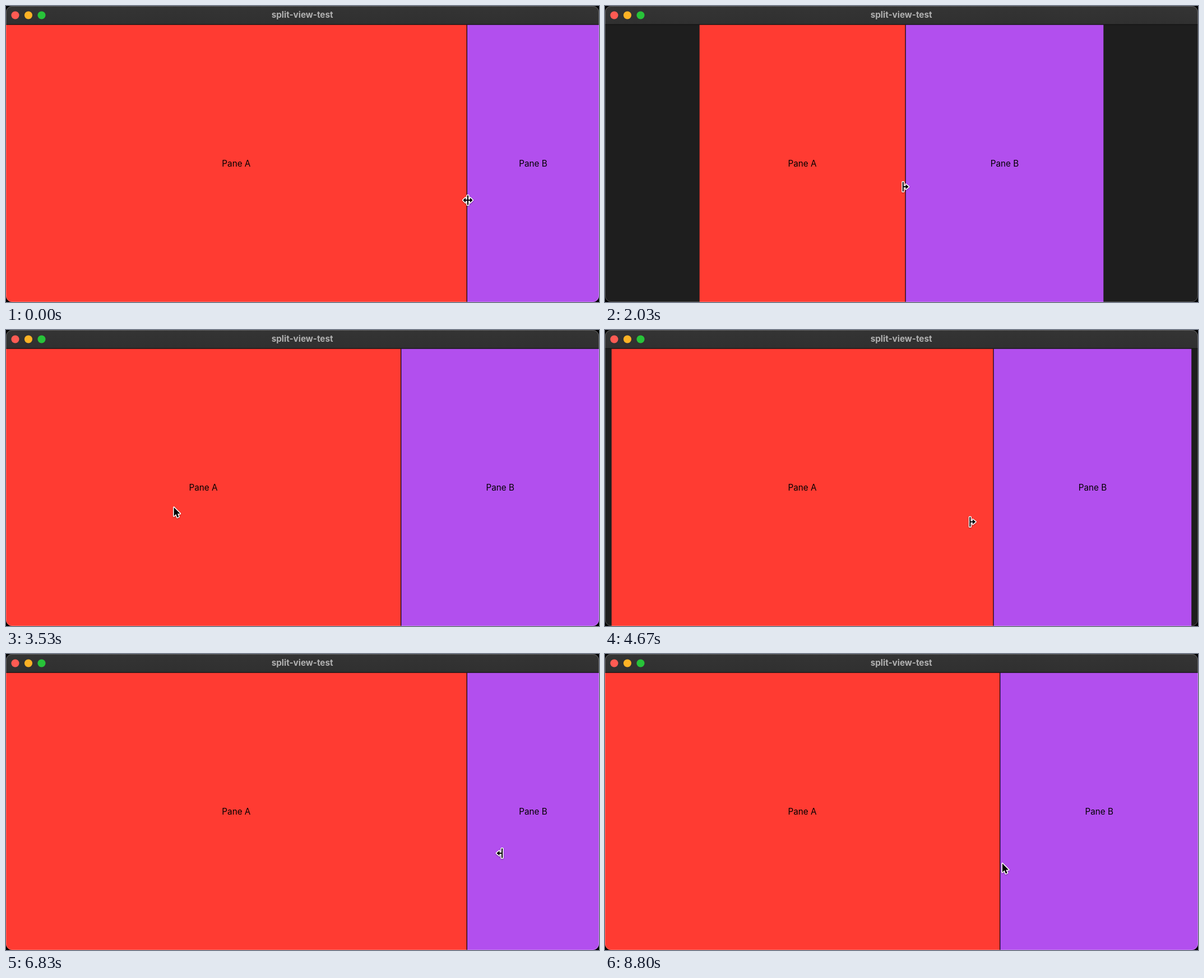
Write an HTML page that moves like this. It is 1058 by 529 pixels and loops after 8.83 s.

```html
<!DOCTYPE html>
<html lang="en">
<head>
<meta charset="utf-8">
<title>split-view-test</title>
<style>
  html, body { margin: 0; width: 100%; height: 100%; overflow: hidden; background: #000; }
  svg { display: block; width: 1058px; height: 529px; }
  text { font: 400 13px Inter, "Open Sans", sans-serif; text-anchor: middle; }
  .title { font-weight: 700; fill: #b1b1b1; }
  #cursor path { stroke: #fff; stroke-width: 2.6; stroke-linejoin: round; paint-order: stroke; }
  #cursor { filter: drop-shadow(0 1px 1px rgba(0, 0, 0, .3)); }
</style>
</head>
<body>
<!-- The window is 900 by 450 points -->
<svg viewBox="0 0 900 450">
  <defs>
    <clipPath id="frame"><rect width="900" height="450" rx="9.5"/></clipPath>
    <linearGradient id="bar" x2="0" y2="1">
      <stop stop-color="#343434"/><stop offset="1" stop-color="#303030"/>
    </linearGradient>
    <path id="half" d="M-4.4-7.3H-2.7V-.8H.4V-3.6L4.9 0 .4 3.6V.8H-2.7V7.3H-4.4Z"/>
  </defs>
  <g clip-path="url(#frame)">
    <rect width="900" height="450" fill="#1e1e1e"/>
    <rect width="900" height="28" fill="url(#bar)"/>
    <rect id="paneA" y="28.5" height="422" fill="#ff3b32"/>
    <rect id="paneB" y="28.5" height="422" fill="#b24fee"/>
    <rect id="divider" y="28.5" width="1" height="422"/>
    <rect y="27.8" width="900" height=".7" fill="#080808"/>
    <circle cx="14" cy="14" r="6" fill="#ff5b53"/>
    <circle cx="34" cy="14" r="6" fill="#fdb225"/>
    <circle cx="54" cy="14" r="6" fill="#28c339"/>
    <text class="title" x="449.7" y="18">split-view-test</text>
    <text id="labelA" y="244">Pane A</text>
    <text id="labelB" y="244">Pane B</text>
  </g>
  <rect x=".4" y=".4" width="899.2" height="449.2" rx="9" fill="none" stroke="#fff" stroke-width=".85" stroke-opacity=".24"/>
  <g id="cursor">
    <path id="both" d="M-.9-7.2H.9V-.9H3.4V-3.7L7.3 0 3.4 3.7V.9H.9V7.2H-.9V.9H-3.4V3.7L-7.3 0-3.4-3.7V-.9H-.9Z"/>
    <path id="right" d="M-4.4-7.3H-2.7V-.8H.4V-3.6L4.9 0 .4 3.6V.8H-2.7V7.3H-4.4Z"/>
    <path id="left" d="M4.4-7.3H2.7V-.8H-.4V-3.6L-4.9 0-.4 3.6V.8H2.7V7.3H4.4Z"/>
    <path id="arrow" d="M0 .4V13.6L3.1 10.7 5.1 15.7 7.4 14.6 5.4 9.9H9.4Z"/>
  </g>
</svg>
<script>
const LOOP = 8830, LAG = 33, PT = 1058 / 900;
const MIN = 200, MAX_B = 300;
const REST = 900 - MAX_B - 1;               // divider with pane B at its widest
const LEFT = (900 - MIN - MAX_B - 1) / 2 + MIN;
const RIGHT = 900 - MIN - 1;

// Pointer sweeps in pixels: start time, end time, x, y
const origin = [824, 347];
const sweeps = [
  [1163, 2013, 536, 323], [2100, 2300, 430, 320], [2500, 2676, 292, 316],
  [3500, 3670, 605, 337], [3830, 4230, 705, 343], [4581, 4831, 440, 342],
  [5270, 6100, 706, 350], [6370, 6830, 881, 356], [6800, 7830, 440, 365],
  [7830, 8670, 705.5, 374], [8700, 8800, 709, 374]
];
const holds = [[1230, 3000], [4600, 5040], [6370, 7800]];

const el = id => document.getElementById(id);
const set = (id, attrs) => {
  for (const k in attrs) el(id).setAttribute(k, attrs[k]);
};
const clamp = (v, lo, hi) => Math.min(hi, Math.max(lo, v));
const ease = u => u < .5 ? 4 * u ** 3 : 1 - 4 * (1 - u) ** 3;

// Sweeps add up, so overlapping ones blend
function pointer(t) {
  let [x, y] = origin, [px, py] = origin;
  for (const [from, to, tx, ty] of sweeps) {
    const k = ease(clamp((t - from) / (to - from), 0, 1));
    x += k * (tx - px);
    y += k * (ty - py);
    [px, py] = [tx, ty];
  }
  return [x / PT, y / PT];
}

const isHeld = t => holds.some(([a, b]) => t >= a && t < b);

function dividerAt(t) {
  if (t < holds[0][0]) return RIGHT;
  if (!isHeld(t)) return REST;
  return clamp(Math.floor(pointer(t - LAG)[0] * 2) / 2, LEFT, RIGHT);
}

function cursorShape(t, x, d) {
  if (!isHeld(t)) return Math.abs(x - d) < 3.5 ? "both" : "arrow";
  return x < REST - 2 ? "right" : x > RIGHT + 4 ? "left" : "both";
}

function draw(t) {
  const d = dividerAt(t), [x, y] = pointer(t);
  // Pane B stops growing at its maximum, so the whole pair shrinks to the centre
  const a = Math.max(0, REST - d), b = Math.min(900, d + 1 + MAX_B);
  set("paneA", { x: a, width: d - a + .5 });
  set("paneB", { x: d + .5, width: b - d - .5 });
  set("divider", { x: d });
  set("labelA", { x: (a + d) / 2 });
  set("labelB", { x: (d + 1 + b) / 2 });

  const shape = cursorShape(t, x, d);
  for (const id of ["both", "right", "left", "arrow"])
    set(id, { display: id === shape ? "inline" : "none" });
  set("cursor", { transform: `translate(${x} ${y})` });
}

const start = performance.now();
function tick() {
  draw((performance.now() - start) % LOOP);
  requestAnimationFrame(tick);
}
tick();
</script>
</body>
</html>
```
